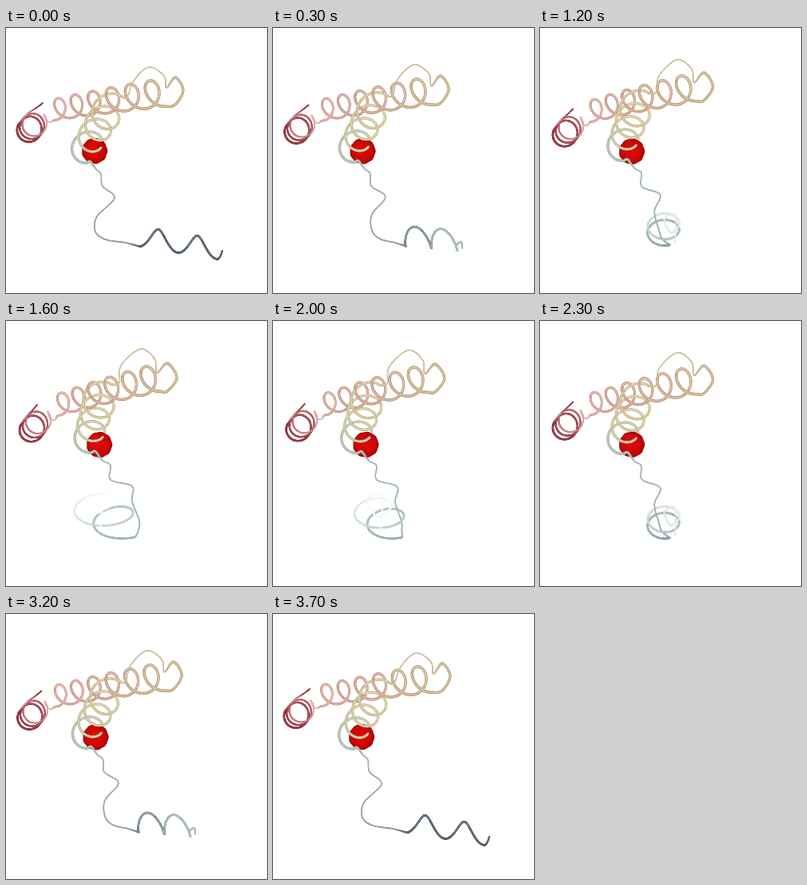
Animation of 327 by 332 pixels, one loop 3900 ms. Source, as an HTML page with a canvas:

```html
<!DOCTYPE html>
<html>
<head>
<meta charset="utf-8">
<title>Chain motion</title>
<style>
html, body { margin: 0; width: 100%; height: 100%; overflow: hidden; background: #fff; }
canvas { display: block; }
</style>
</head>
<body>
<canvas id="stage" width="327" height="332"></canvas>
<script>
const ctx = document.getElementById('stage').getContext('2d');
const LOOP = 3900;

// Start of each pose in ms; the chain swings out and back in equal steps.
const STARTS = [0, 200, 300, 500, 800, 900, 1200, 1400, 1500, 1600, 1800, 2000, 2100, 2300, 2500, 2800, 3000, 3200, 3400, 3700];
const swingAt = i => Math.min(i, STARTS.length - 1 - i) / 9;

const WHITE = [255, 255, 255];
const mix = (a, b, t) => a.map((v, i) => v + (b[i] - v) * t);
const css = c => `rgb(${c.map(Math.round).join(',')})`;

function gradient(...colors) {
  return t => {
    const p = Math.min(t, 0.9999) * (colors.length - 1), i = Math.floor(p);
    return mix(colors[i], colors[i + 1], p - i);
  };
}

// Every part moves in a straight line between its two extreme poses.
// Coils: start centre, end centre, cosine vector, sine vector.
const RED = [[28, 129, 37, 119, 0, 15, 14.5, 0], [31, 138, 42, 124, 0, 15, 14.5, 0]];
const PINK = [[58, 103, 197, 81, 2, 15, 13, 0], [63, 106, 191, 71, 2, 15, 13, 0]];
const GOLD = [[131, 99, 96, 155, 0, 17, 18, 0], [119, 93, 102, 151, 0, 17, 19, 0]];
const TAIL = [[167, 261, 265, 277, 0, 12.5, 2, -1], [148, 258, 100, 226, 12, 13, -28, 9]];

// Loose stretches: x, y pairs.
const TIP = [[46, 94, 38, 100, 26, 108], [39, 105, 33, 112, 25, 120]];
const LINK = [[50, 115, 55, 118], [55, 122, 61, 124]];
const ARCH = [
  [212, 96, 222, 78, 212, 62, 201, 75, 198, 60, 179, 49, 160, 66, 152, 87],
  [202, 88, 214, 71, 202, 53, 189, 65, 186, 47, 168, 35, 144, 56, 142, 77]
];
const THREAD = [
  [113, 177, 119, 183, 121, 198, 136, 213, 114, 236, 112, 255, 125, 265, 150, 269],
  [121, 175, 131, 181, 131, 199, 158, 207, 158, 226, 167, 250, 166, 262, 163, 269]
];
const END = [[267, 288, 269, 285, 271, 279], [100, 215, 120, 210, 118, 264]];

const reds = gradient([150, 32, 50], [158, 35, 52], [180, 65, 72], [228, 165, 165]);
const pinks = gradient([228, 165, 155], [216, 158, 140], [212, 172, 142], [210, 182, 138]);
const tans = gradient([208, 185, 138], [212, 188, 145], [208, 196, 160]);
const golds = gradient([214, 200, 148], [214, 205, 152], [208, 204, 160], [170, 192, 180]);

function buildStrand(k) {
  const nodes = [];

  function loose([from, to], width, color) {
    const p = mix(from, to, k), n = p.length / 2;
    for (let i = 0; i < n; i++) {
      const t = i / (n - 1);
      nodes.push({ x: p[2 * i], y: p[2 * i + 1], w: width(t), c: color(t), front: true });
    }
  }

  // Angles are in half turns; grow widens the coil towards its end, bow pulls its middle sideways.
  function coil([from, to], start, stop, width, color, grow = 0, bow = 0) {
    const [x0, y0, x1, y1, vx, vy, wx, wy] = mix(from, to, k);
    const n = Math.round((stop - start) * 9);
    for (let i = 0; i <= n; i++) {
      const t = i / n, a = (start + (stop - start) * t) * Math.PI;
      const c = Math.cos(a), s = Math.sin(a), g = 1 + grow * (2 * t - 1);
      const front = c - s > 0;
      nodes.push({
        x: x0 + (x1 - x0) * t + bow * 4 * t * (1 - t) + g * (vx * c + wx * s),
        y: y0 + (y1 - y0) * t + g * (vy * c + wy * s),
        w: width(t), c: mix(color(t), WHITE, front ? 0 : 0.1), front
      });
    }
  }

  const tailColor = mix([66, 86, 104], [150, 182, 180], Math.sqrt(k));
  const threadColor = mix([128, 152, 160], [155, 180, 178], k);
  const fade = Math.pow(k, 0.6);
  const tailAt = t => mix(tailColor, WHITE, fade * Math.min(1, 1.6 * Math.pow(t, 1.5)));

  loose(TIP, () => 1.7, reds);
  coil(RED, 1.25, 6.75, t => 2.5 - t * 0.8, reds);
  loose(LINK, () => 1.2, () => [222, 178, 174]);
  coil(PINK, 0, 12, t => 2.6 + t * 0.8, pinks, 0.15, -5);
  loose(ARCH, t => t < 0.3 ? 3.2 : 1.4, tans);
  coil(GOLD, 0.75, 8.2, () => 3, golds, -0.1);
  loose(THREAD, () => 1.6, t => mix([165, 188, 185], threadColor, t));
  coil(TAIL, 0, 4, () => 2.4, t => tailAt(t * 0.85));
  loose(END, () => 2, t => tailAt(0.85 + t * 0.15));
  return nodes;
}

function spline(a, b, c, d, t) {
  return 0.5 * (2 * b + (c - a) * t + (2 * a - 5 * b + 4 * c - d) * t * t + (3 * b - a - 3 * c + d) * t * t * t);
}

function smooth(nodes) {
  const parts = [], last = nodes.length - 1, DIV = 6;
  for (let i = 0; i < last; i++) {
    const a = nodes[Math.max(0, i - 1)], b = nodes[i], c = nodes[i + 1], d = nodes[Math.min(last, i + 2)];
    const at = t => [spline(a.x, b.x, c.x, d.x, t), spline(a.y, b.y, c.y, d.y, t)];
    for (let j = 0; j < DIV; j++) {
      const t = j / DIV;
      parts.push({
        p: at(t), q: at(t + 1 / DIV), w: b.w + (c.w - b.w) * t,
        c: mix(b.c, c.c, t), front: b.front
      });
    }
  }
  return parts;
}

function strokeParts(parts, scale, shade) {
  for (const s of parts) {
    ctx.strokeStyle = css(shade(s.c));
    ctx.lineWidth = s.w * scale;
    ctx.beginPath();
    ctx.moveTo(...s.p);
    ctx.lineTo(...s.q);
    ctx.stroke();
  }
}

// Darker rim, more so on strong colours, with a lighter core.
function drawTube(parts) {
  strokeParts(parts, 1, c => c.map(v => v - 0.3 * (255 - Math.min(...c)) * v / 255));
  strokeParts(parts, 0.42, c => mix(c, WHITE, 0.2));
}

function drawBall(k) {
  const [x, y] = mix([111, 154], [117, 155], k);
  const glow = ctx.createRadialGradient(x - 2, y - 2, 3, x, y, 17);
  glow.addColorStop(0, '#e00808');
  glow.addColorStop(0.7, '#cc0505');
  glow.addColorStop(1, '#850608');
  ctx.fillStyle = glow;
  ctx.beginPath();
  for (let i = 0; i < 60; i++) {
    const a = i * Math.PI / 30, r = 16 + 0.3 * Math.cos(9 * a);
    ctx.lineTo(x + r * Math.cos(a), y + r * Math.sin(a));
  }
  ctx.fill();
}

function draw(k) {
  ctx.fillStyle = '#fff';
  ctx.fillRect(0, 0, 327, 332);
  ctx.lineCap = 'round';
  const parts = smooth(buildStrand(k));
  drawTube(parts.filter(s => !s.front));
  drawBall(k);
  drawTube(parts.filter(s => s.front));
}

const begin = performance.now();
let shown = -1;

function tick() {
  const t = Math.max(0, performance.now() - begin) % LOOP;
  const k = swingAt(STARTS.filter(s => s <= t).length - 1);
  if (k !== shown) draw(shown = k);
  requestAnimationFrame(tick);
}
tick();
</script>
</body>
</html>
```
